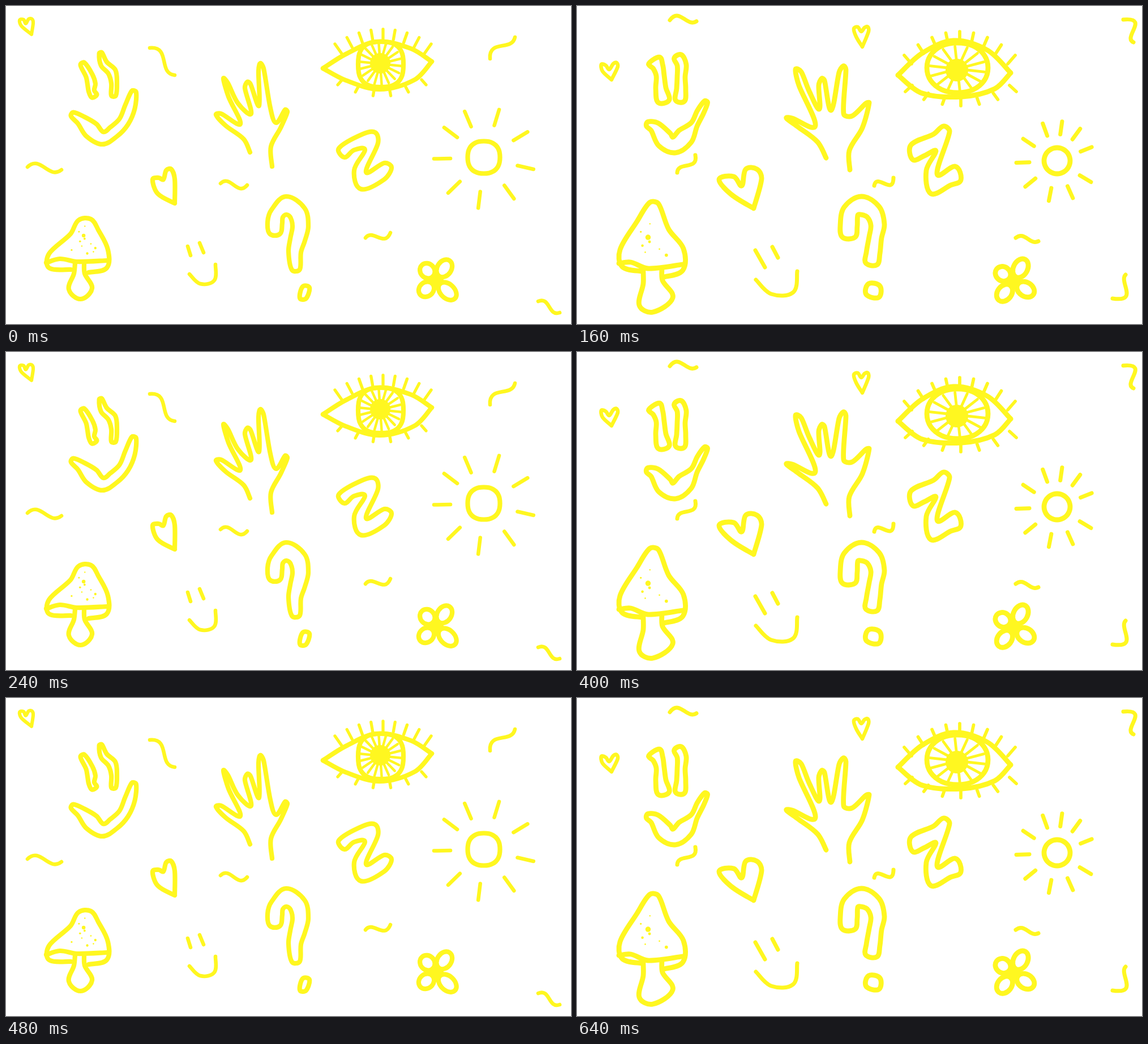
An HTML page for the animation above (720 ms loop, 998x561 px).

```html
<!DOCTYPE html>
<html lang="en">
<head>
<meta charset="utf-8">
<title>Doodles</title>
<style>
html, body { margin: 0; width: 100%; height: 100%; overflow: hidden; background: #fff; }
svg { display: block; width: 100vw; height: 100vh; }
g { fill: none; stroke: #fff720; stroke-linecap: round; stroke-linejoin: round; }
.ink { fill: #fff720; stroke: none; }
</style>
</head>
<body>
<svg id="stage" viewBox="0 0 998 561"></svg>
<script>
const NS = 'http://www.w3.org/2000/svg';
const STEP = 80;
const PEN = [8.2, 8.5, 8.8];
const RAD = Math.PI / 180;

function add(parent, tag, attrs) {
  const el = document.createElementNS(NS, tag);
  for (const k in attrs) el.setAttribute(k, attrs[k]);
  return parent.appendChild(el);
}

const stage = document.getElementById('stage');
const poses = PEN.map(() => add(stage, 'g', { display: 'none' }));

// Draws a shape in the first and last pose and halfway between them.
function both(shape, a, b, scale = 1) {
  const half = a.map((v, i) => (v + b[i]) / 2);
  [a, half, b].forEach((values, i) => shape(poses[i], values, PEN[i] * scale));
}

const stroke = (g, d, width) => add(g, 'path', { d, 'stroke-width': width });
const disc = (g, [cx, cy, r]) => add(g, 'circle', { cx, cy, r, class: 'ink' });
const line = (g, [x, y, x2, y2], width) => stroke(g, `M${x} ${y}L${x2} ${y2}`, width);

function chunk(values, size) {
  const out = [];
  for (let i = 0; i < values.length; i += size) out.push(values.slice(i, i + size));
  return out;
}

// Smooth curve through key points; handles shrink at sharp turns.
function curve(p, closed) {
  const n = p.length;
  const at = i => closed ? p[(i + n) % n] : p[Math.max(0, Math.min(n - 1, i))];
  const handle = (i, span) => {
    const dx = at(i + 1)[0] - at(i - 1)[0], dy = at(i + 1)[1] - at(i - 1)[1];
    const chord = Math.hypot(dx, dy) || 1;
    const k = Math.min(span / 3, chord / 5) / chord;
    return [dx * k, dy * k];
  };
  let d = 'M' + p[0];
  for (let i = 0; i < (closed ? n : n - 1); i++) {
    const [x, y] = at(i), [x2, y2] = at(i + 1);
    const span = Math.hypot(x2 - x, y2 - y);
    const [hx, hy] = handle(i, span), [kx, ky] = handle(i + 1, span);
    d += `C${x + hx} ${y + hy} ${x2 - kx} ${y2 - ky} ${x2} ${y2}`;
  }
  return d;
}

const open = (g, v, w) => stroke(g, curve(chunk(v, 2), false), w);
const loop = (g, v, w) => stroke(g, curve(chunk(v, 2), true) + 'Z', w);

// Outline around a spine of x, y, half-width triples.
function ribbon(g, values, w) {
  const spine = chunk(values, 3), end = spine.length - 1;
  const side = sign => spine.map(([x, y, h], i) => {
    const a = spine[Math.max(0, i - 1)], b = spine[Math.min(end, i + 1)];
    const dx = b[0] - a[0], dy = b[1] - a[1], k = sign * h / Math.hypot(dx, dy);
    return [x + dy * k, y - dx * k];
  });
  stroke(g, curve([...side(1), ...side(-1).reverse()], true) + 'Z', w);
}

// S-curve between two points with a sideways bend near each end.
function squiggle(g, [x, y, x2, y2, bend, back], w) {
  const dx = x2 - x, dy = y2 - y, len = Math.hypot(dx, dy);
  const point = (t, b) => `${x + dx * t + dy / len * b} ${y + dy * t - dx / len * b}`;
  stroke(g, `M${x} ${y}C${point(0.35, bend)} ${point(0.65, back)} ${x2} ${y2}`, w);
}

// Rounded shape; a power below 1 makes it squarer.
function oval(g, [cx, cy, rx, ry, power], w) {
  const soft = v => Math.sign(v) * Math.abs(v) ** power;
  const pts = Array.from({ length: 24 }, (_, i) => {
    const a = i / 24 * 2 * Math.PI;
    return [cx + rx * soft(Math.cos(a)), cy + ry * soft(Math.sin(a))];
  });
  stroke(g, curve(pts, true) + 'Z', w);
}

function spokes(g, [count, cx, cy, rx, ry], w) {
  const n = Math.round(count);
  for (let i = 0; i < n; i++) {
    const a = (i + 0.3) / n * 2 * Math.PI;
    line(g, [cx, cy, cx + rx * Math.cos(a), cy + ry * Math.sin(a)], w);
  }
}

// Lashes fan out from an arched lid.
function lashes(g, [count, cx, half, y, sag, dx, dy], w) {
  const n = Math.round(count);
  for (let i = 0; i < n; i++) {
    const t = 2 * i / (n - 1) - 1, x = cx + t * half, base = y + sag * t * t;
    line(g, [x, base, x + t * dx, base + dy], w);
  }
}

function rays(g, [cx, cy, inner, outer, ...angles], w) {
  for (const a of angles) {
    const c = Math.cos(a * RAD), s = Math.sin(a * RAD);
    line(g, [cx + c * inner, cy + s * inner, cx + c * outer, cy + s * outer], w);
  }
}

// Petals are given by angle and reach.
function flower(g, [cx, cy, core, ...petals], w) {
  for (const [angle, reach] of chunk(petals, 2)) {
    add(g, 'ellipse', {
      cx: (reach + 9) / 2, rx: (reach - 9) / 2, ry: 12.5, 'stroke-width': w,
      transform: `translate(${cx} ${cy}) rotate(${angle})`
    });
  }
  disc(g, [cx, cy, core]);
}

// Seeded spots that spread out below the tip of the cap.
function spots(g, [count, x, y, half, height, size]) {
  let seed = 11;
  const random = () => (seed = seed * 16807 % 2147483647) / 2147483647;
  for (let i = 0; i < Math.round(count); i++) {
    const down = Math.sqrt((i + 0.5) / count);
    const r = 1.2 + (size - 1.2) * random() ** 2;
    disc(g, [x + half * down * (2 * random() - 1), y + height * down, r]);
  }
}

// Hearts start and end at the lower tip.
both(open,
  [45,50, 27,35, 24,25, 31,24, 35,31, 40,23, 46,23, 48,30, 45,50],
  [61,130, 45,115, 43,103, 51,105, 57,112, 64,102, 70,100, 72,107, 61,130], 0.75);
both(open,
  [298,348, 268,331, 259,306, 270,303, 278,306, 283,290, 292,288, 298,305, 298,348],
  [312,357, 272,332, 251,306, 277,301, 291,317, 298,288, 318,288, 326,305, 312,357]);
for (const g of poses.slice(1)) {
  open(g, [504,72, 493,54, 489,40, 496,37, 502,45, 508,38, 514,37, 515,45, 504,72], 6.5);
}

// Wavy face
both(ribbon,
  [135,102,4, 147,123,6, 151,138,7, 151,150,5, 156,159,5],
  [136,96,11, 143,107,9, 147,123,7, 148,145,9, 153,168,10]);
both(ribbon,
  [167,83,2.5, 173,102,6, 187,116,7, 191,136,5, 190,158,4],
  [178,89,7, 185,104,8, 184,125,7, 184,146,8, 182,167,8]);
both(ribbon,
  [117,191,4, 132,201,8, 151,219,14, 171,233,11, 190,222,10, 208,204,9, 219,178,9, 226,151,4],
  [124,208,4, 137,213,9, 155,236,15, 172,245,14, 191,230,15, 207,209,6, 218,187,6, 228,169,3]);

// Loose squiggles
both(squiggle, [254,74, 298,122, 30,-20], [164,25, 211,27, 24,-12], 0.8);
both(squiggle, [38,284, 98,289, 24,-20], [177,294, 209,263, 14,-24], 0.8);
both(squiggle, [379,313, 426,316, 18,-22], [525,317, 559,303, 20,-30], 0.8);
both(squiggle, [635,409, 679,400, 14,-24], [775,409, 815,415, 15,-10], 0.8);
both(squiggle, [855,93, 899,55, 28,-16], [965,24, 983,64, 45,-15], 0.8);
both(squiggle, [940,521, 978,541, 18,-16], [946,516, 969,474, -45,5], 0.8);

// Hand, from the right of the wrist over thumb and fingers
both(open,
  [470,283, 468,248, 485,215, 497,187, 493,183, 477,206, 467,180, 455,110, 449,101,
   446,115, 447,176, 432,138, 426,134, 422,145, 433,190, 410,172, 392,136, 384,128,
   393,160, 414,208, 380,190, 371,192, 388,211, 420,235, 431,258],
  [482,289, 481,255, 504,215, 516,171, 510,172, 486,194, 471,190, 475,112, 470,106,
   463,117, 449,184, 437,131, 432,128, 427,140, 428,182, 410,150, 396,116, 386,112,
   392,140, 421,211, 380,198, 370,198, 390,213, 425,240, 440,268]);

// Eye
both(open, [560,110, 600,85, 655,63, 715,75, 752,98], [567,122, 610,83, 665,61, 725,78, 766,118]);
both(open, [752,98, 722,130, 660,147, 600,131, 560,110], [766,118, 738,146, 680,160, 610,154, 567,122]);
both(oval, [662,103, 40,40, 0.75], [672,109, 54,44, 0.95]);
both(spokes, [18, 661,102, 37,37], [14, 672,111, 49,40], 0.55);
both(disc, [661,101,18], [671,113,20]);
both(lashes, [9, 666,73, 58,26, 12,-17], [9, 676,85, 60,42, 13,-15], 0.65);
both(lashes, [6, 664,70, 150,-20, 8,9], [7, 678,86, 165,-25, 12,11], 0.65);

// Numeral
both(loop,
  [588,251, 630,226, 652,223, 657,242, 636,293, 668,277, 681,285, 668,306, 627,323,
   615,290, 634,254, 615,254, 598,267],
  [590,245, 630,226, 647,212, 658,222, 636,296, 668,283, 678,307, 660,316, 625,331,
   617,290, 634,256, 614,264, 593,271]);

// Sun
both(oval, [844,267, 28.5,28.5, 0.85], [848,273, 23,23, 1]);
both(rays,
  [845,268, 60,89, -143,-113,-73,-31,-9, 13,54,97,136,179].filter(v => v !== -9),
  [847,274, 48,71, -146,-110,-82,-54, 31,66,101,141,178], 0.8);
rays(poses[2], [847,274, 46,67, -22], PEN[2] * 0.8);

// Question mark
both(ribbon,
  [475,402,9, 475,382,13, 479,366,12, 495,352,16, 515,365,15, 520,389,14, 515,412,13, 510,434,11, 512,465,7],
  [480,408,11, 480,388,15, 484,362,14, 502,352,16, 523,363,14, 531,386,12, 527,408,11, 523,436,12, 520,455,10]);
both(loop, [524,495, 536,497, 530,516, 519,515], [515,490, 535,494, 533,514, 511,509]);

// Mushroom: cap, underside, stem
both(open,
  [146,470, 178,462, 180,430, 163,395, 150,376, 128,378, 114,402, 76,437, 76,462, 115,465],
  [154,478, 187,466, 188,428, 162,394, 144,349, 128,347, 106,380, 76,430, 80,460, 115,468]);
both(open, [71,453, 95,446, 125,451, 178,449], [74,454, 95,452, 125,463, 186,456]);
both(open,
  [122,453, 120,472, 111,500, 132,517, 152,498, 139,472, 138,453],
  [117,468, 117,490, 110,528, 134,540, 169,515, 151,484, 150,462]);
both(spots, [11, 140,375, 33,63, 4], [8, 130,365, 44,77, 6]);

// Small face
both(line, [321,424, 326,440], [315,431, 332,461], 0.8);
both(line, [342,418, 349,435], [345,425, 355,444], 0.8);
both(open, [324,473, 343,490, 368,484, 370,456], [316,483, 343,508, 382,505, 389,468], 0.8);

both(flower,
  [760,484, 13, -133,37, -56,42, 44,46, 138,38],
  [771,486, 12, -144,37, -62,44, 33,42, 128,42]);

let start;
function tick(now) {
  start ??= now;
  const current = Math.floor((now - start) / STEP) % poses.length;
  poses.forEach((g, i) => g.setAttribute('display', i === current ? 'inline' : 'none'));
  requestAnimationFrame(tick);
}
requestAnimationFrame(tick);
</script>
</body>
</html>
```
